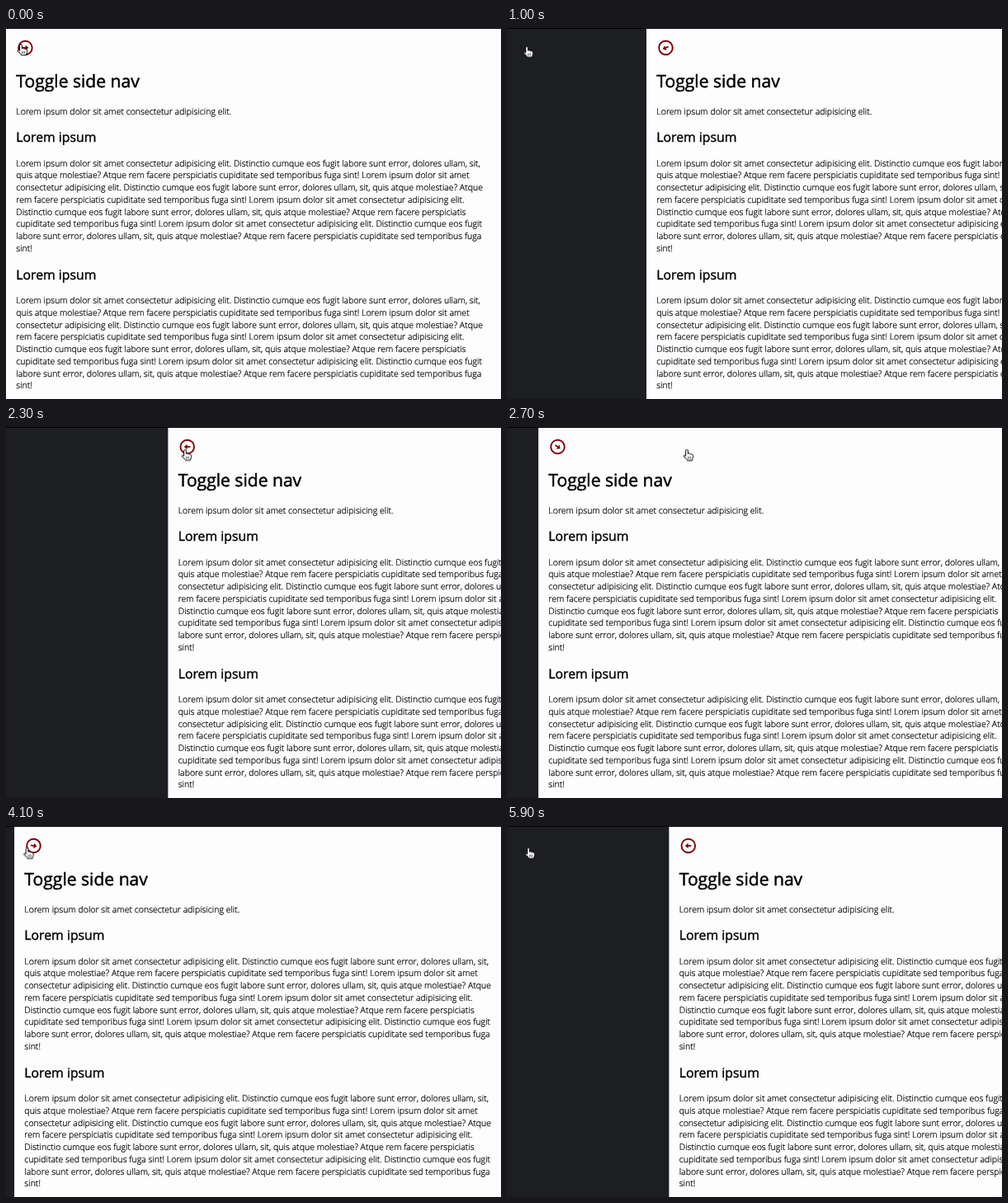
Animation of 600x450 px, one loop 6 s. Source, as an HTML page:

```html
<!DOCTYPE html>
<html lang="en">
<head>
<meta charset="utf-8">
<title>Toggle side nav</title>
<style>
  @property --open { syntax: "<number>"; inherits: true; initial-value: 0; }

  html, body { margin: 0; width: 100%; height: 100%; overflow: hidden; background: #fefdfe; }
  svg { display: block; width: 600px; height: 450px; overflow: hidden; }

  text {
    font: 300 10.54px "Open Sans", "Noto Sans", sans-serif;
    text-rendering: geometricPrecision;
    stroke: #000;
    stroke-width: .22px;
  }
  .h1 { font-size: 21.08px; font-weight: 400; stroke-width: .5px; }
  .h2 { font-size: 15.81px; font-weight: 400; stroke-width: .4px; }

  .page {
    transform: translateX(calc(var(--open) * 196.4px));
    animation: toggle 6s infinite paused;
  }
  .arrow { transform: rotate(calc(var(--open) * 180deg)); }
  .hand { animation: move 6s infinite paused; }

  @keyframes toggle {
    0%, 11.95% { --open: 0; animation-timing-function: ease; }
    20.283%, 40.8% { --open: 1; animation-timing-function: ease; }
    49.133%, 67.77% { --open: 0; animation-timing-function: ease; }
    76.1%, 100% { --open: 1; }
  }
  @keyframes move {
    0% { transform: translate(18px, 20px); }
    3.33%, 6% { transform: translate(18.6px, 20px); }
    11.67%, 17.5% { transform: translate(24px, 22.5px); animation-timing-function: ease-in; }
    28.33% { transform: translate(160px, 28.5px); animation-timing-function: ease-out; }
    38.33% { transform: translate(217px, 27.5px); }
    41.67%, 47.5% { transform: translate(218px, 27.5px); animation-timing-function: ease-in; }
    51.67% { transform: translate(137px, 29px); animation-timing-function: ease-out; }
    63.33%, 68.33% { transform: translate(25.5px, 26.5px); }
    71.67%, 100% { transform: translate(26px, 26.5px); }
  }
</style>
</head>
<body>
<svg viewBox="0 0 600 450">
  <g class="page">
    <rect x="-210" width="210" height="450" fill="#1d1e22"/>

    <g transform="translate(23.4 24)">
      <g class="arrow" fill="#7d0000" stroke="#7d0000">
        <circle r="8.3" fill="none" stroke-width="1.9"/>
        <path d="M-3.6 0H1" stroke-width="1.8"/>
        <path d="M.2 -3.2L4 0L.2 3.2z" stroke="none"/>
      </g>
    </g>

    <g transform="translate(12.3 0)">
      <text class="h1" y="72.4">Toggle side nav</text>
      <text y="104.5">Lorem ipsum dolor sit amet consectetur adipisicing elit.</text>
      <g id="section">
        <text class="h2" y="138.1">Lorem ipsum</text>
        <text y="167.6">
          <tspan x="0">Lorem ipsum dolor sit amet consectetur adipisicing elit. Distinctio cumque eos fugit labore sunt error, dolores ullam, sit,</tspan>
          <tspan x="0" dy="1.4em">quis atque molestiae? Atque rem facere perspiciatis cupiditate sed temporibus fuga sint! Lorem ipsum dolor sit amet</tspan>
          <tspan x="0" dy="1.4em">consectetur adipisicing elit. Distinctio cumque eos fugit labore sunt error, dolores ullam, sit, quis atque molestiae? Atque</tspan>
          <tspan x="0" dy="1.4em">rem facere perspiciatis cupiditate sed temporibus fuga sint! Lorem ipsum dolor sit amet consectetur adipisicing elit.</tspan>
          <tspan x="0" dy="1.4em">Distinctio cumque eos fugit labore sunt error, dolores ullam, sit, quis atque molestiae? Atque rem facere perspiciatis</tspan>
          <tspan x="0" dy="1.4em">cupiditate sed temporibus fuga sint! Lorem ipsum dolor sit amet consectetur adipisicing elit. Distinctio cumque eos fugit</tspan>
          <tspan x="0" dy="1.4em">labore sunt error, dolores ullam, sit, quis atque molestiae? Atque rem facere perspiciatis cupiditate sed temporibus fuga</tspan>
          <tspan x="0" dy="1.4em">sint!</tspan>
        </text>
      </g>
      <use href="#section" y="166.6"/>
    </g>
  </g>

  <rect width="600" height="1"/>

  <g class="hand" stroke="#000" stroke-linejoin="round">
    <path fill="#fff" d="M-1.4 1.3a1.4 1.4 0 0 1 2.8 0V5.2q.4-.9 1.4-.7q.9.1 1.1.9q.5-.5 1.3-.3q.8.2.9 1q.8-.3 1.3.2q.5.4.4 1.3q-.1 2-.9 3.4q-.4.8-.4 1.9H.4q-.3-1.3-1.3-2.4L-3.6 8.6q-.6-1 .1-1.6q.8-.5 1.6.3l.5.6z"/>
    <path fill="none" stroke-width=".6" d="M1.5 8.3v2.8M3.1 8.3v2.8M4.7 8.3v2.8"/>
  </g>
</svg>
<script>
  // The picture advances ten times a second, so the keyframe clock is stepped.
  const TICK = 100, LOOP = 6000, LEAD = 16;
  const motions = document.getAnimations();

  function draw() {
    const time = Math.floor((performance.now() + LEAD) / TICK) * TICK % LOOP;
    for (const motion of motions) motion.currentTime = time;
    requestAnimationFrame(draw);
  }
  draw();
</script>
</body>
</html>
```
